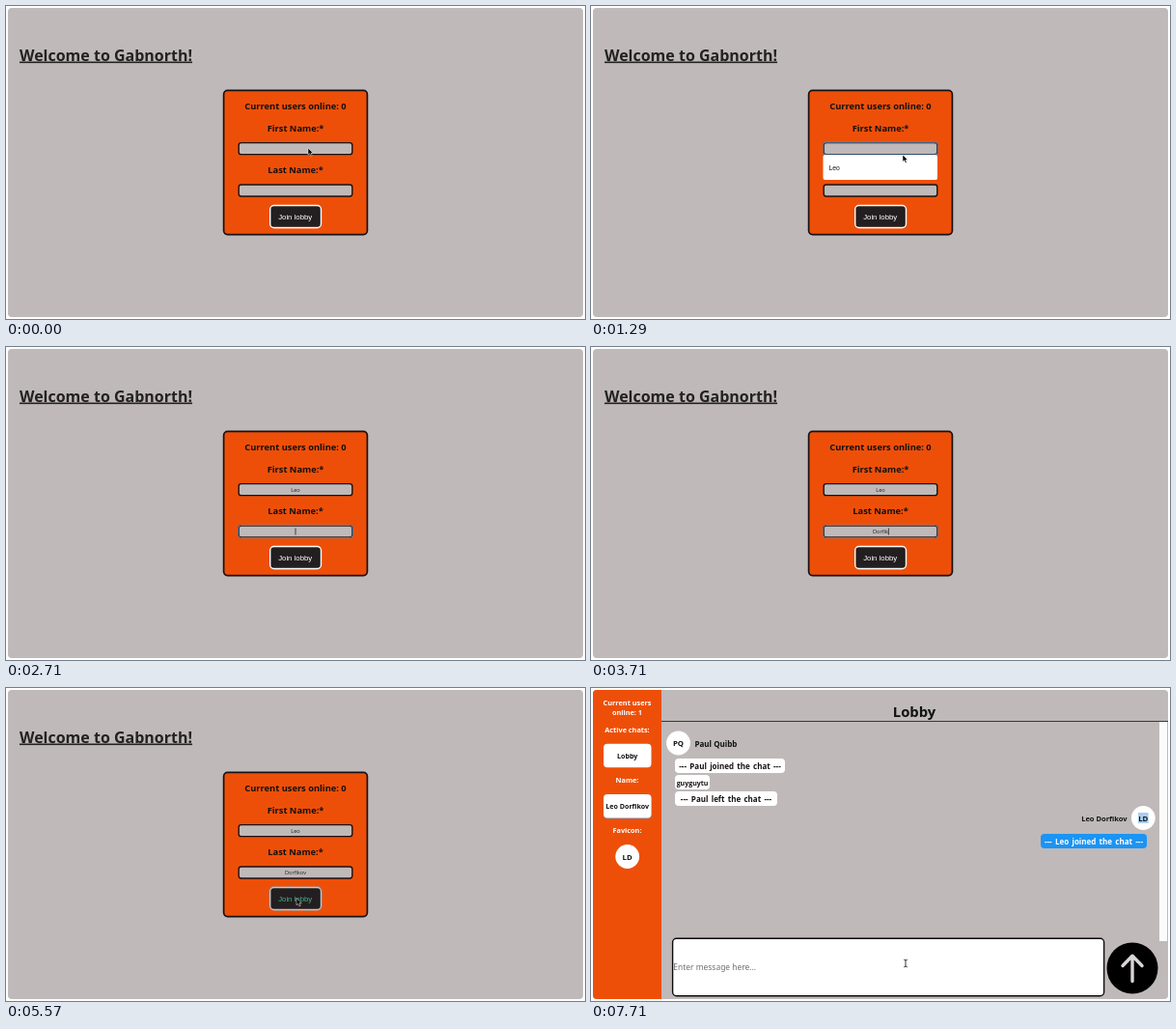
An HTML page that plays this animation: 600 by 324 pixels, repeating every 8000 ms.

```html
<!DOCTYPE html>
<html lang="en">
<head>
<meta charset="utf-8">
<title>Chat lobby</title>
<style>
  html, body { margin: 0; height: 100%; overflow: hidden; background: #fff; }
  svg { display: block; width: 100%; height: 100%; }
  text { font: 700 9.3px "Open Sans", "Noto Sans", sans-serif; fill: #111; }
  text.title { font: 700 16px "Noto Sans", sans-serif; fill: #242122; text-decoration: underline; }
  text.ui { font: 400 7.8px "Liberation Sans", Arial, sans-serif; }
  text.hint { font: 400 8.45px "Noto Sans", sans-serif; fill: #707070; }
  text.typed { font: 400 5.6px "Open Sans", sans-serif; fill: #222; }
  .bubble { word-spacing: 1.2px; }
</style>
</head>
<body>
<svg viewBox="0 0 600 324">
  <clipPath id="panel"><rect x="2" y="2" width="596" height="320" rx="4"/></clipPath>
  <g clip-path="url(#panel)">
    <rect width="600" height="324" fill="#bfb9b9"/>
    <g id="login"></g>
    <g id="lobby"></g>
  </g>
  <path id="arrow" d="M0 0V7.2L1.7 5.7 2.9 8.4 4.2 7.8 3 5.2H5.2Z" fill="#000" stroke="#fff" stroke-width=".5"/>
  <path id="beam" d="M-1.8-3.8Q0-3.8 0-2.8Q0-3.8 1.8-3.8M0-3V3M-1.8 3.8Q0 3.8 0 2.8Q0 3.8 1.8 3.8" fill="none" stroke="#222" stroke-width=".9"/>
</svg>
<script>
const LOOP = 8000, RATE = 7;
const FIRST = "Leo", LAST = "Dorfikov", OTHER = "Paul";
const ORANGE = "#ee4f08", INK = "#161314";
const $ = id => document.getElementById(id);

const text = (x, y, str, { size, fill, cls = "", anchor = "middle", id = "" } = {}) =>
  `<text id="${id}" class="${cls}" x="${x}" y="${y}" text-anchor="${anchor}" style="${
    size ? `font-size:${size}px;` : ""}${fill ? `fill:${fill}` : ""}">${str}</text>`;

const box = (x, y, w, h, r, fill, more = "") =>
  `<rect x="${x}" y="${y}" width="${w}" height="${h}" rx="${r}" fill="${fill}" ${more}/>`;

const edge = (color, width) => `stroke="${color}" stroke-width="${width}"`;

const field = (id, y) =>
  box(241.2, y, 117.6, 12, 2.4, "#bfb9b9", edge(INK, 1.4)) +
  box(240.8, y - .4, 118.4, 12.8, 2.6, "none", `id="${id}Ring" ${edge("#4d86bd", 1)}`) +
  text(300, y + 8.2, "", { cls: "typed", id }) +
  `<path id="${id}Caret" d="M0 ${y + 2.5}v7" ${edge("#111", .7)}/>`;

const badge = (x, y, str) =>
  `<circle cx="${x}" cy="${y}" r="12.4" fill="#fff"/>` + text(x, y + 3, str, { size: 7.8 });

const bubble = (x, y, w, str, fill = "#fff", color = INK, size = 8) =>
  box(x, y, w, 15, 4, fill) +
  text(x + w / 2, y + 10.6, str, { size, fill: color, cls: "bubble" });

const side = (y, str) => text(37.5, y, str, { size: 7.3, fill: "#fff" });
const tab = (y, str) => box(13, y, 49.5, 24.5, 4, "#fff") + text(37.7, y + 15, str, { size: 7.1 });

$("login").innerHTML =
  text(14, 56.5, "Welcome to Gabnorth!", { cls: "title", anchor: "start" }) +
  box(225.6, 87.4, 148.8, 149.2, 4, ORANGE, edge(INK, 1.7)) +
  text(300, 107.3, "Current users online: 0") +
  text(300, 129.6, "First Name:*") +
  text(300, 173.3, "Last Name:*") +
  field("first", 141.6) + field("last", 185) +
  box(273.7, 206.5, 52.8, 23, 4, "#231f20", `id="join" ${edge("#fff", 1.4)}`) +
  box(272.6, 205.4, 55, 25.2, 5, "none", `id="joinRing" ${edge("#8b8b8b", .9)} stroke-dasharray="1.2 1.2"`) +
  text(299.7, 220.6, "Join lobby", { cls: "ui", id: "joinText", fill: "#fff" }) +
  `<g id="suggest">${box(240.5, 154, 118.5, 26, 2, "#fff")}${
    text(246.5, 169.6, FIRST, { cls: "ui", size: 6.8, anchor: "start" })}</g>`;

const line = (who, verb) => `--- ${who} ${verb} the chat ---`;
$("lobby").innerHTML =
  box(0, 0, 73, 324, 0, ORANGE) +
  side(17.5, "Current users") + side(28, "online: 1") +
  side(46, "Active chats:") + tab(57.7, "Lobby") +
  side(98, "Name:") + box(13, 111, 49.5, 24.2, 4, "#5d93cf") + tab(110, `${FIRST} ${LAST}`) +
  side(150.3, "Favicon:") + badge(37.7, 174.5, "LD") +
  text(335, 29.6, "Lobby", { size: 14.8 }) +
  `<path d="M73 34.5H598" ${edge("#3a3637", 1)}/>` +
  box(589, 35, 8, 227, 0, "#fcfbfb") +
  badge(90.5, 57, "PQ") +
  text(107.5, 60.6, `${OTHER} Quibb`, { size: 8, anchor: "start" }) +
  bubble(87, 73, 114, line(OTHER, "joined")) +
  bubble(87, 90, 36, "guyguytu", "#fff", INK, 7) +
  bubble(87, 107, 106, line(OTHER, "left")) +
  text(555.5, 138, `${FIRST} ${LAST}`, { size: 7.5, anchor: "end" }) +
  badge(572.3, 134.5, "") + box(567, 129, 10.6, 11, 0, "#a9cdf0") +
  text(572.3, 137.5, "LD", { size: 7.8 }) +
  bubble(466, 151, 110, line(FIRST, "joined"), "#1b94f3", "#fff") +
  box(84.6, 259.2, 447, 59.6, 4, "#fff", edge("#0c0a0b", 1.4)) +
  text(85.3, 291.6, "Enter message here...", { cls: "hint", anchor: "start" }) +
  `<circle cx="561" cy="290" r="26.5" fill="#000"/>
   <path d="M561 303.5V278M551 287.5L561 277.3 571 287.5" fill="none" ${edge("#d9d5d5", 3.4)}
     stroke-linecap="round" stroke-linejoin="round"/>`;

// Pointer stops: [tick, x, y]
const PATH = [[0, 313, 147], [9, 323, 154], [29, 323, 154], [32, 336, 161], [34, 328, 186],
  [36, 303, 214], [38, 301, 217], [40, 301, 218], [51, 301, 218], [54, 326, 285]];

function pointer(k) {
  const i = Math.max(1, PATH.findIndex(p => p[0] >= k));
  const a = PATH[i - 1], b = PATH[i];
  if (k >= PATH.at(-1)[0]) return PATH.at(-1).slice(1);
  const u = (k - a[0]) / (b[0] - a[0]);
  return [a[1] + (b[1] - a[1]) * u, a[2] + (b[2] - a[2]) * u];
}

const show = (id, on) => $(id).setAttribute("visibility", on ? "visible" : "hidden");

function setField(id, value, focused, caretOn) {
  const el = $(id);
  if (el.textContent !== value) el.textContent = value;
  const x = 300 + (value ? el.getComputedTextLength() / 2 + .4 : 0);
  $(id + "Caret").setAttribute("transform", `translate(${x} 0)`);
  $(id + "Ring").style.display = focused ? "" : "none";
  $(id + "Caret").style.display = focused && caretOn ? "" : "none";
}

function draw(now) {
  // The screen refreshes seven times a second.
  const k = Math.floor((now % LOOP + 5) * RATE / 1000) % (LOOP * RATE / 1000);
  const inLobby = k >= 40, hover = k >= 36, pressed = k >= 38;
  $("login").style.display = inLobby ? "none" : "";
  $("lobby").style.display = inLobby ? "" : "none";

  if (!inLobby) {
    const first = k < 15 ? "" : FIRST.slice(0, k < 17 ? 1 : k < 18 ? 2 : 3);
    const last = LAST.slice(0, Math.max(0, k - 20));
    setField("first", first, k >= 3 && k < 19, k < 9 ? k % 7 < 5 : k >= 12);
    setField("last", last, k >= 19 && !pressed, k < 33 || k >= 36);
    $("suggest").style.display = k >= 4 && k < 19 ? "" : "none";
    $("joinText").style.fill = hover ? "#3fae8c" : "#fff";
    $("join").setAttribute("stroke", pressed ? "#c9c6c4" : "#fff");
    $("joinRing").style.display = pressed ? "" : "none";
  }

  const [x, y] = pointer(k), typing = k >= 15 && k < 29;
  const overText = inLobby && y > 259;
  for (const id of ["arrow", "beam"]) $(id).setAttribute("transform", `translate(${x} ${y})`);
  show("arrow", !typing && !overText);
  show("beam", overText);
}

function loop() {
  draw(performance.now());
  requestAnimationFrame(loop);
}
loop();
</script>
</body>
</html>
```
